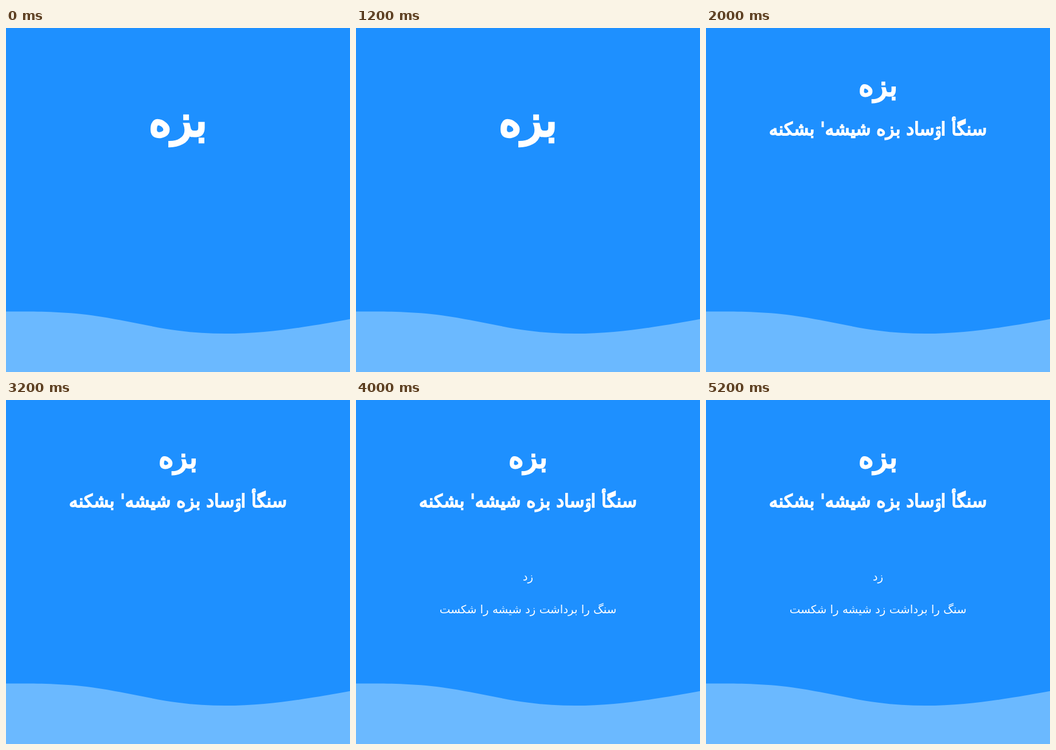
Recreate the animation shown at these times as an HTML page. Size 600x600 px, loop 6 s.

```html
<!DOCTYPE html>
<html lang="glk">
<head>
<meta charset="utf-8">
<style>
  html, body { margin: 0; height: 100%; overflow: hidden; background: #1e90ff; }
  svg { display: block; width: 600px; height: 600px; }
  text { fill: #fff; font-family: "DejaVu Sans", sans-serif; text-anchor: middle; direction: rtl; }
  /* A stroked regular weight stays narrower than the bold face. */
  .heavy { stroke: #fff; stroke-width: .06em; }
</style>
</head>
<body>
<svg viewBox="0 0 600 600">
  <path fill="#6bb9ff" transform="translate(0 467.8) scale(.41667)"
    d="M0 64H60C120 64 240 64 360 80S600 128 720 144S960 160 1080 149.3S1320 117 1380 106.7L1440 96V330H0Z"/>
  <text id="title" class="heavy" x="300">بزه</text>
  <text id="example" class="heavy" x="300" y="187" font-size="31">سنگأ اۊساد بزه شیشهˈ بشکنه</text>
  <g id="meaning" font-size="19.8">
    <text x="300" y="315">زد</text>
    <text x="300" y="372">سنگ را برداشت زد شیشه را شکست</text>
  </g>
</svg>
<script>
  const STEP = 2000, STEPS = 3;
  const [title, example, meaning] = ["title", "example", "meaning"].map(id => document.getElementById(id));
  const show = (el, on) => el.setAttribute("visibility", on ? "visible" : "hidden");

  function draw() {
    const step = Math.floor(performance.now() / STEP) % STEPS;
    title.setAttribute("y", step ? 118 : 188);
    title.setAttribute("font-size", step ? 50 : 75);
    show(example, step >= 1);
    show(meaning, step >= 2);
    requestAnimationFrame(draw);
  }
  draw();
</script>
</body>
</html>
```
